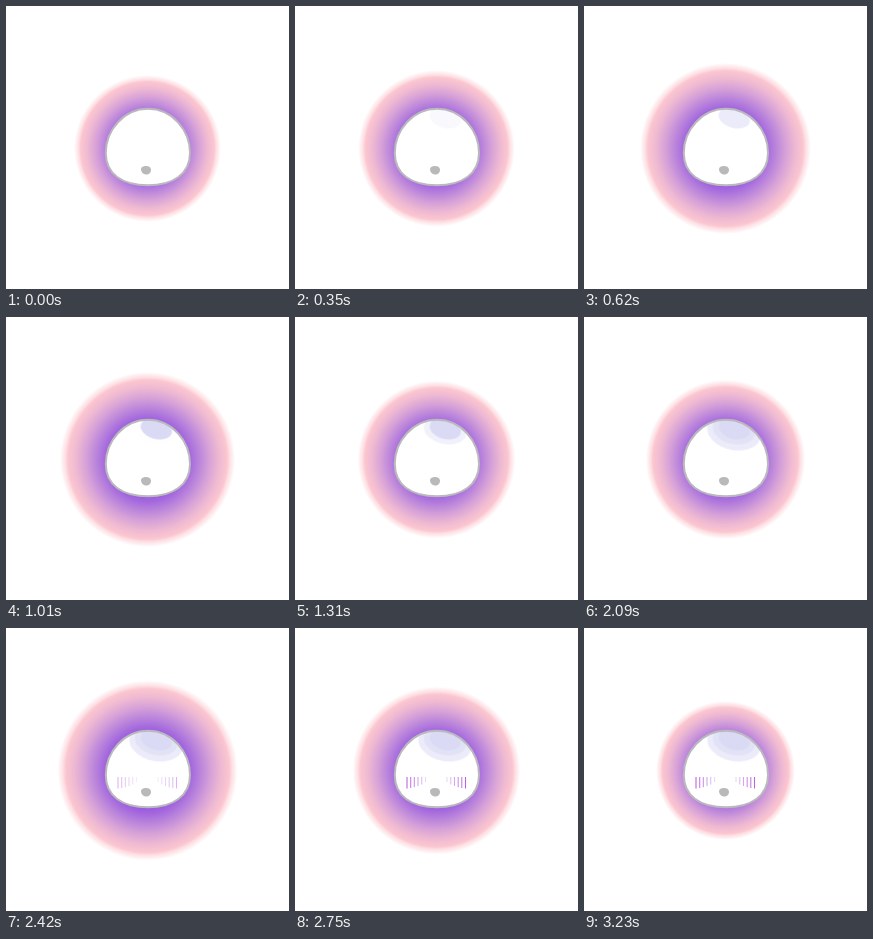
These frames come from a looping animation (283 by 283 pixels, 3600 ms). An HTML page:

```html
<!DOCTYPE html>
<html lang="en">
<head>
<meta charset="utf-8">
<title>Glowing dumpling</title>
<style>
  html, body { margin: 0; width: 100%; height: 100%; overflow: hidden; background: #fff; }
  svg { display: block; width: 100vw; height: 100vh; }

  .glow { animation: pulse 3600ms infinite; }
  .fade { opacity: 0; animation: 3600ms linear infinite; }
  .inner { animation-name: inner; }
  .middle { animation-name: middle; }
  .outer { animation-name: outer; }
  .blush { animation-name: blush; }

  /* The glow advances every 30 ms and rests at both ends of the loop. */
  @keyframes pulse {
    0% { transform: scale(.735); animation-timing-function: linear; }
    5.556% { transform: scale(.735); animation-timing-function: steps(23, start); }
    24.722% { transform: scale(.92); animation-timing-function: steps(28, start); }
    48.056% { transform: scale(.675); animation-timing-function: steps(26, start); }
    69.722% { transform: scale(.92); animation-timing-function: steps(25, start); }
    90.556%, 100% { transform: scale(.695); }
  }
  @keyframes inner { 0%, 6% { opacity: 0; } 27%, 100% { opacity: 1; } }
  @keyframes middle { 0%, 27% { opacity: 0; } 47%, 100% { opacity: 1; } }
  @keyframes outer { 0%, 38% { opacity: 0; } 56%, 100% { opacity: 1; } }
  @keyframes blush { 0%, 60% { opacity: 0; } 75%, 100% { opacity: 1; } }
</style>
</head>
<body>
<svg viewBox="0 0 283 283">
  <defs>
    <radialGradient id="aura">
      <stop offset=".38" stop-color="#9651e0"/>
      <stop offset=".48" stop-color="#a468de"/>
      <stop offset=".58" stop-color="#b983dc"/>
      <stop offset=".7" stop-color="#d6a1d8"/>
      <stop offset=".82" stop-color="#efbad2"/>
      <stop offset=".91" stop-color="#fcc7d0"/>
      <stop offset=".935" stop-color="#fddde2"/>
      <stop offset="1" stop-color="#fff"/>
    </radialGradient>
    <path id="body" d="M142 102.8C166 102.8 184 124 184 147C184 168 167 179.3 142 179.3C116 179.3 99.8 168 99.8 147C99.8 124 118 102.8 142 102.8Z"/>
    <clipPath id="inside"><use href="#body"/></clipPath>
    <g id="cheek" stroke-width="1.1">
      <path d="M112 149V160.5" stroke="#bd63e2"/>
      <path d="M115.7 149V160" stroke="#c57ce6"/>
      <path d="M119.3 149V159.2" stroke="#cc92e8"/>
      <path d="M123 149V158" stroke="#d4a8ec"/>
      <path d="M126.7 149V156.5" stroke="#debfef"/>
      <path d="M130.5 149V154" stroke="#e9d8f5"/>
    </g>
  </defs>

  <g transform="translate(141.5 142.5)">
    <circle class="glow" r="100" fill="url(#aura)"/>
  </g>

  <use href="#body" fill="#fff"/>
  <g clip-path="url(#inside)">
    <ellipse class="fade outer" cx="150" cy="115.5" rx="27" ry="17.5" transform="rotate(12 150 115.5)" fill="#ebebfa"/>
    <ellipse class="fade middle" cx="150" cy="113.5" rx="21.5" ry="13.5" transform="rotate(13 150 113.5)" fill="#e2e2f7"/>
    <ellipse class="fade inner" cx="150.3" cy="112" rx="16" ry="10" transform="rotate(15 150.3 112)" fill="#dadaf4"/>
  </g>
  <use href="#body" fill="none" stroke="#b9b9be" stroke-width="2"/>

  <g class="fade blush">
    <use href="#cheek"/>
    <use href="#cheek" transform="translate(282.5 0) scale(-1 1)"/>
  </g>
  <path d="M138 160.2C141 159.4 144.8 160.4 145 163.4C145.2 166.6 142.6 168.8 139.8 168.5C137 168.3 135 166.2 135 163.6C135 161.6 136.2 160.6 138 160.2Z" fill="#b9b9b9"/>
</svg>
</body>
</html>
```
